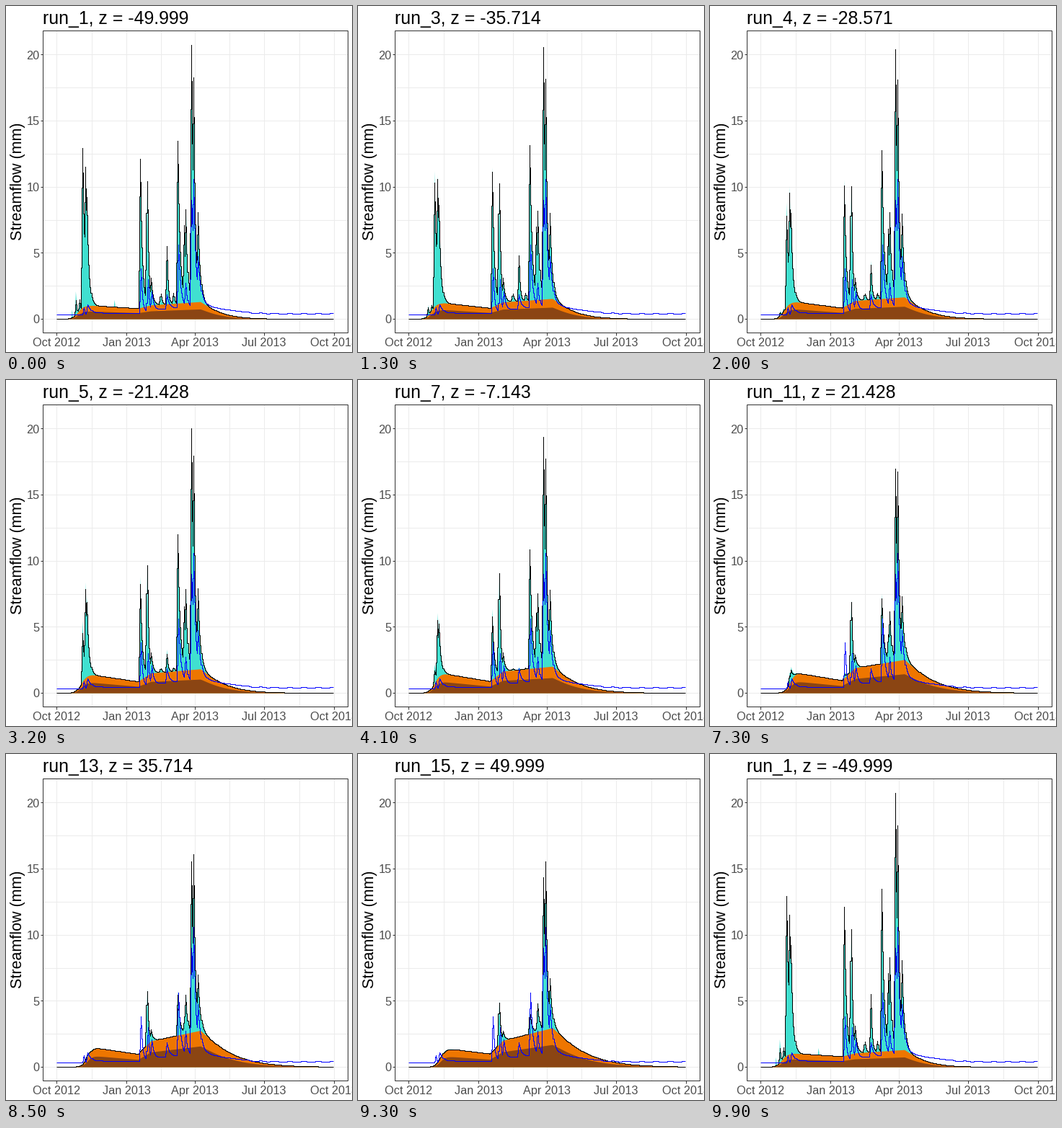
These frames come from a looping animation (480 by 480 pixels, 10 s). A matplotlib script:

```python
import numpy as np
import matplotlib.pyplot as plt
from matplotlib.animation import FuncAnimation
from matplotlib.patches import Polygon, Rectangle

plt.rcParams["font.family"] = "Liberation Sans"
plt.rcParams["path.simplify"] = False

SIZE, DPI = 480, 96
PX = 72 / DPI
X0, DAY_PX = 70, 1.055
Y0, MM_PX = 434, 18.33
LEFT, RIGHT, TOP, BOTTOM = 51, 474, 34, 453
RUNS = 15
FRAMES, INTERVAL = 100, 100
STARTS = [4, 11, 18, 25, 32, 39, 46, 52, 59, 66, 73, 79, 85, 91, 97]
STEPS = 3

days = np.arange(365)
xs = X0 + DAY_PX * days

# Day, peak in mm, decay in days, and how many runs the storm takes to fade
STORMS = [
    (26, 1.4, .8, 3), (30, 1.45, .8, 3.5), (34, 12.95, 2.7, 4.2),
    (38, 11.5, 2.7, 7), (40, 9.2, 2.5, 8), (110, 12.1, 2.7, 7),
    (119, 10.4, 1.7, 16), (124, 3.1, 2.5, 40), (137, 1.9, 1.5, 40),
    (145, 5.5, 1.6, 5.5), (154, 1.95, 1, 40), (159, 13.45, 3, 13),
    (168, 7.1, 1, 15), (170, 8.3, 2.2, 19), (177, 20.75, 3, 23),
    (180, 18.25, 2.3, 35), (186, 8.05, 2.8, 33),
]
# Short bursts that never reach the stream: day, peak
BURSTS = [(20, .75), (25, 2.1), (76, 1.45)]
# Observed storms: day, peak, decay
OBSERVED = [
    (36, .9, 1), (41, 1.1, 5), (111, 3.8, 2), (120, 3, 1.5), (125, 2.05, 3),
    (145, 1.85, 3), (160, 5.6, 3), (170, 2.75, 2), (177, 9, 6),
    (180, 10.6, 3), (186, 4.75, 4),
]


def to_y(mm):
    return Y0 - MM_PX * np.asarray(mm)


def pulse(base, day, peak, decay, rise=2):
    """A storm on top of base: linear rise, exponential recession."""
    dt = days - day
    shape = np.where(dt < 0, np.clip(1 + dt / rise, 0, 1),
                     np.exp(-np.maximum(dt, 0) / decay))
    return base + max(0, peak - base[day]) * shape


def slow_flow(step):
    """Autumn rise, winter dip, spring maximum and summer recession."""
    t = step / (RUNS - 1)
    level = np.interp(days, [47, 107, 124, 189],
                      [1.02 + 1.5 * t - 1.1 * t * t, .8 + .2 * t,
                       1.05 + 1.7 * t - .75 * t * t, 1.3 + 1.65 * t])
    rise = 1 / (1 + np.exp(-(days - 28 - 14 * t) / 3.5))
    recession = np.exp(-(np.maximum(days - 189, 0) / (27 + 16 * t)) ** 1.15)
    return level * rise * recession


def streamflow(step):
    slow = slow_flow(step)
    return np.max([pulse(slow, day, peak * np.exp(-(step / fade) ** 2), decay)
                   for day, peak, decay, fade in STORMS], axis=0)


def simulate(step):
    slow, total = slow_flow(step), streamflow(step)
    quick = np.maximum(total, streamflow(max(0, step - .4)))
    for day, peak in BURSTS:
        burst = pulse(slow, day, peak * np.exp(-step / 1.5), .4, rise=1)
        quick = np.maximum(quick, burst)
    return np.array([quick, slow, .57 * slow, total])


def observe():
    base = np.interp(days, [35, 60, 108, 150, 200, 225, 260, 300],
                     [.32, .45, .45, .85, .9, .7, .45, .4])
    base = base + .03 * np.sin(days / 3) * (days > 250)
    return np.max([pulse(base, *storm) for storm in OBSERVED], axis=0)


def staircase(y):
    """Turn a daily curve into level and upright strokes one pixel wide."""
    x = np.rint(xs)
    middle = (y[1:] + y[:-1]) / 2
    corners_x = np.column_stack([x[:-1], x[:-1], x[1:]]).ravel()
    corners_y = np.column_stack([y[:-1], middle, middle]).ravel()
    return np.append(corners_x, x[-1]), np.append(corners_y, y[-1])


states = [simulate(step) for step in range(RUNS)]

fig = plt.figure(figsize=(SIZE / DPI, SIZE / DPI), dpi=DPI, facecolor="white")
ax = fig.add_axes([0, 0, 1, 1])
ax.set_xlim(0, SIZE)
ax.set_ylim(SIZE, 0)
ax.axis("off")


def stroke(x, y, color, z):
    return ax.plot(x, y, color=color, lw=PX, snap=True, zorder=z,
                   solid_capstyle="butt", solid_joinstyle="miter")[0]


def label(x, y, text, size, color="black", **kw):
    return ax.text(x, y, text, fontsize=size * PX, color=color,
                   va="baseline", **kw)


GRID, FRAME, TICK_TEXT = "#EBEBEB", "#333333", "#4D4D4D"
months = {70: "Oct 2012", 167: "Jan 2013", 262: "Apr 2013",
          358: "Jul 2013", 455: "Oct 2013"}
majors = np.array(list(months))
for x in [*majors, *(majors[1:] + majors[:-1]) / 2]:
    stroke([x, x], [TOP, BOTTOM], GRID, 1)
for mm in np.arange(0, 21, 2.5):
    stroke([LEFT, RIGHT], [to_y(mm)] * 2, GRID, 1)
for x, text in months.items():
    stroke([x, x], [BOTTOM, BOTTOM + 4], FRAME, 6)
    label(x, 472, text, 16.2, TICK_TEXT, ha="center")
for mm in range(0, 21, 5):
    stroke([LEFT - 3, LEFT], [to_y(mm)] * 2, FRAME, 6)
    label(46.5, to_y(mm) + 6.3, str(mm), 16.2, TICK_TEXT, ha="right")
ax.add_patch(Rectangle((LEFT, TOP), RIGHT - LEFT, BOTTOM - TOP, fill=False,
                       ec=FRAME, lw=PX, snap=True, zorder=6))
label(22, 243.5, "Streamflow (mm)", 21.5, ha="center", rotation=90,
      rotation_mode="anchor")
title = label(51.3, 25.5, "", 24.9, ha="left")

areas = [ax.add_patch(Polygon([(0, 0), (1, 0), (1, 1)], fc=color, lw=0, zorder=2))
         for color in ("#40E0D0", "#EE7600", "#8B4513")]
total_line = stroke([], [], "black", 4)
stroke(*staircase(to_y(observe())), "blue", 5)


def update(frame):
    passed = sum(start <= frame for start in STARTS)
    if passed:
        progress = min(1, (frame - STARTS[passed - 1] + 1) / STEPS)
        before, after = passed - 1, passed % RUNS
    else:
        progress, before, after = 0, 0, 0
    curves = (1 - progress) * states[before] + progress * states[after]
    for area, curve in zip(areas, curves):
        top = np.column_stack([xs, to_y(curve)])
        outline = np.vstack([(xs[0], Y0), top, (xs[-1], Y0)])
        area.set_xy(outline + .5)
    total_line.set_data(*staircase(to_y(curves[3])))

    run = (after if progress > .5 else before) + 1
    z = round(49.999 * (run - 8) / 7, 3)
    title.set_text(f"run_{run}, z = {z:g}")
    return [*areas, total_line, title]


anim = FuncAnimation(fig, update, frames=FRAMES, interval=INTERVAL,
                     repeat=True, repeat_delay=0, blit=False)
plt.show()
```
